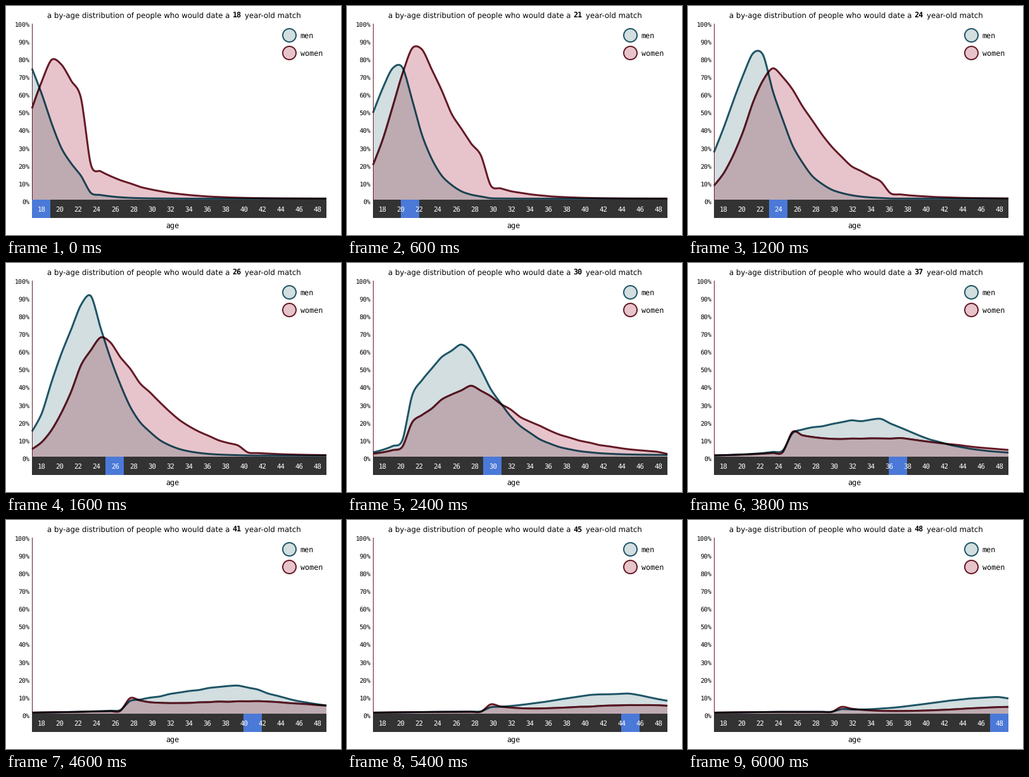
Write a matplotlib script that moves like this. It is 529 by 363 pixels and loops after 7 s.

```python
import numpy as np
import matplotlib.pyplot as plt
from matplotlib.animation import FuncAnimation
from matplotlib.patches import Circle, PathPatch, Rectangle
from matplotlib.path import Path

plt.rcParams["text.hinting"] = "none"

W, H, DPI = 529, 363, 64
LEFT, RIGHT, BASE, BAR_END = 41, 506, 307, 336
FIRST, LAST = 18, 48
AGES = np.arange(FIRST, LAST + 1)
BAND = (RIGHT - LEFT) / (len(AGES) + 1)
STEP_MS, HOLD = 200, 4
LINE = 3

MEN_LINE, MEN_FILL = np.array([31, 85, 102]) / 255, np.array([210, 222, 224]) / 255
WOMEN_LINE, WOMEN_FILL = np.array([101, 26, 38]) / 255, np.array([231, 196, 203]) / 255
MONO, SANS = "DejaVu Sans Mono", "DejaVu Sans"

# How the bell of each curve develops with the age of the match
KEYS = [18, 21, 26, 30, 37, 48]
MEN = dict(peak=[208, 215, 249, 176, 57, 23], centre=[18, 20.9, 24, 27.5, 35, 47],
           rise=[4.3, 4.3, 4.5, 7, 13, 9.6], bump=[0, 0, 0, 0, 0, 3],
           fall=(2.6, 0.2), seed=1)
WOMEN = dict(peak=[222, 243, 187, 106, 26, 8], centre=[20.5, 22.7, 25.4, 28.3, 37, 49],
             rise=[3.7, 3.8, 4.4, 7.5, 20, 8], bump=[0, 0, 0, 0, 17, 8],
             fall=(5.2, 0.28), seed=2)


def heights(sex, match):
    """Lopsided bell, cut down outside the half-plus-seven ages."""
    peak = np.exp(np.interp(match, KEYS, np.log(sex["peak"])))
    centre, rise, bump = (np.interp(match, KEYS, sex[k]) for k in ("centre", "rise", "bump"))
    base, slope = sex["fall"]
    fall = base + slope * abs(match - 21)

    d = AGES - centre
    bell = np.where(d < 0, np.exp(-(d / rise) ** 2), np.exp(-(abs(d) / fall) ** 1.25))
    h = peak * bell

    youngest, oldest = np.ceil(match / 2) + 7, 2 * match - 13
    below = youngest - AGES
    low = np.clip(1 - 0.15 * (match - 25.5), 0.22, 1)
    h *= np.where(below > 0, low ** (1 + (below - 1) / 6), 1)
    h *= np.where(AGES > oldest, 0.4, 1)
    h += np.where(below <= 0, bump * np.exp(np.minimum(below, 0) / 2.2), 0)

    ripple = np.random.default_rng(100 * sex["seed"] + match).normal(0, 0.015, len(AGES))
    floor = 1.2 + 1.5 * (1 - low) * np.minimum((AGES - FIRST) / 6, 1)
    return h * (1 + ripple) + floor


def smooth(h):
    """Cardinal spline through the yearly points, as a dense polyline."""
    p = np.column_stack([np.linspace(LEFT, RIGHT, len(h)), BASE - 0.4 - h])
    pull = 0.15 * (p[2:] - p[:-2])
    c1, c2 = p[:-1].copy(), p[1:].copy()
    c1[1:] += pull
    c2[:-1] -= pull
    s = np.linspace(0, 1, 12, endpoint=False)[None, :, None]
    a, b, c, d = (q[:, None, :] for q in (p[:-1], c1, c2, p[1:]))
    pts = (1 - s) ** 3 * a + 3 * s * (1 - s) ** 2 * b + 3 * s ** 2 * (1 - s) * c + s ** 3 * d
    return np.vstack([pts.reshape(-1, 2), p[-1:]])


def closed(pts):
    return Path(np.vstack([pts, pts[:1]]), closed=True)


def area(pts):
    return closed(np.vstack([pts, [[RIGHT, BASE + 1], [LEFT, BASE + 1]]]))


def stroke(pts):
    d = np.gradient(pts, axis=0)
    n = np.column_stack([-d[:, 1], d[:, 0]]) / np.hypot(d[:, 0], d[:, 1])[:, None]
    return closed(np.vstack([pts + n * LINE / 2, (pts - n * LINE / 2)[::-1]]))


def pt(px):
    return px * 72 / DPI


fig = plt.figure(figsize=(W / DPI, H / DPI), dpi=DPI, facecolor="white")
ax = fig.add_axes([0, 0, 1, 1])
ax.set_xlim(0, W)
ax.set_ylim(H, 0)
ax.axis("off")


def label(x, y, text, size=11.8, font=MONO, color="black", **kw):
    return ax.text(x, y, text, fontsize=pt(size), family=font, color=color,
                   va="baseline", zorder=8, **kw)


def box(x, y, w, h, color, z):
    return ax.add_patch(Rectangle((x, y), w, h, fc=color, lw=0, zorder=z))


class Layer:
    """A filled curve with its outline."""

    def __init__(self, fill, line, z):
        self.fill = ax.add_patch(PathPatch(area(np.zeros((2, 2))), fc=fill, lw=0, zorder=z))
        self.line, = ax.plot([], [], color=line, lw=pt(LINE), zorder=z + 0.1,
                             solid_capstyle="butt", solid_joinstyle="round")

    def set(self, pts, clip=None):
        self.fill.set_path(area(pts))
        self.line.set_data(pts[:, 0], pts[:, 1])
        if clip is not None:
            for part in (self.fill, self.line):
                part.set_clip_path(clip, ax.transData)


# Overlaps multiply: the men's curve is repainted inside the women's shapes
men_layer = Layer(MEN_FILL, MEN_LINE, 1)
women_layer = Layer(WOMEN_FILL, WOMEN_LINE, 2)
in_fill = Layer(MEN_FILL * WOMEN_FILL, MEN_LINE * WOMEN_FILL, 3)
in_line = Layer(MEN_FILL * WOMEN_LINE, MEN_LINE * WOMEN_LINE, 4)

box(LEFT, 28, 1, BASE - 28, WOMEN_LINE, 5)
box(LEFT, BASE, RIGHT - LEFT, BAR_END - BASE, "#333333", 6)
marker = box(LEFT, BASE, 2 * BAND, BAR_END - BASE, "#4b79d8", 7)

for i in range(11):
    label(37.7, 313.7 - 28.1 * i, f"{10 * i}%", 10, ha="right")
for n in AGES[::2]:
    label(LEFT + BAND * (n - FIRST + 1) + 0.4, 325.5, str(n), 10.8, color="white", ha="center")

label(65, 18.5, "a by-age distribution of people who would date a", font=SANS)
number = label(357.6, 18.5, "", weight="bold")
label(377, 18.5, "year-old match", font=SANS)
label(262.5, 352, "age", ha="center")

for y, name, fill, line in ((46.5, "men", MEN_FILL, MEN_LINE),
                            (74.5, "women", WOMEN_FILL, WOMEN_LINE)):
    ax.add_patch(Circle((447.5, y), 10.5, fc=fill, ec=line, lw=pt(2), zorder=8))
    label(464.6, y + 4.5, name)


def draw(frame):
    match = min(FIRST + frame, LAST)
    m, w = smooth(heights(MEN, match)), smooth(heights(WOMEN, match))
    men_layer.set(m)
    women_layer.set(w)
    in_fill.set(m, area(w))
    in_line.set(m, stroke(w))
    marker.set_x(LEFT + BAND * (match - FIRST))
    number.set_text(str(match))
    return []


anim = FuncAnimation(fig, draw, frames=len(AGES) + HOLD, init_func=lambda: draw(0),
                     interval=STEP_MS, repeat=True, repeat_delay=0, blit=False)
plt.show()
```
